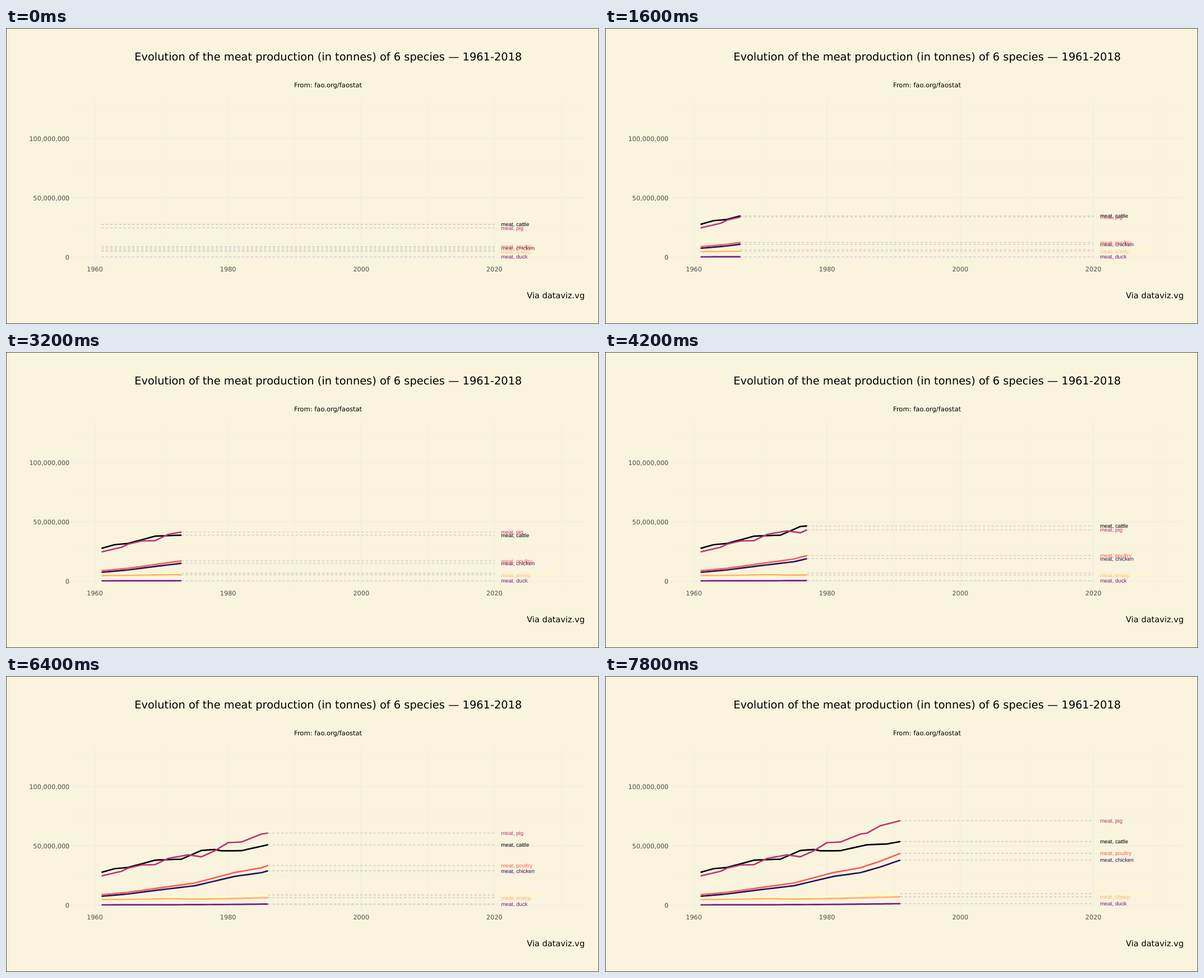
An HTML page that plays this animation: 1058 by 529 pixels, repeating every 8000 ms.

```html
<!DOCTYPE html>
<html lang="en">
<head>
<meta charset="utf-8">
<title>Meat production</title>
<style>
  html, body { margin: 0; width: 100%; height: 100%; overflow: hidden; background: #faf3dd; }
  svg { display: block; width: 1058px; height: 529px; text-rendering: geometricPrecision; }
  text { font-family: "DejaVu Sans", sans-serif; }
  .axis { font-size: 11.3px; fill: #4d4d4d; }
  .mid { text-anchor: middle; }
  .end { text-anchor: end; }
  .label { font: 9.7px "Liberation Sans", Arial, sans-serif; }
  .major { stroke: #ebebeb; stroke-width: 1.07; }
  .minor { stroke: #ebebeb; stroke-width: .53; }
  .dash { stroke: #bebebe; stroke-width: 1.07; stroke-dasharray: 3.92; }
  .line { fill: none; stroke-width: 2.7; stroke-linejoin: round; }
</style>
</head>
<body>
<svg viewBox="0 0 1058 529">
  <g id="grid"></g>
  <g id="plot"></g>
  <text class="mid" x="574.8" y="58" font-size="19.42">Evolution of the meat production (in tonnes) of 6 species — 1961-2018</text>
  <text class="mid" x="574.6" y="105.5" font-size="11.55">From: fao.org/faostat</text>
  <text class="end" x="1032.4" y="482.9" font-size="14.6">Via dataviz.vg</text>
  <rect x=".5" y=".5" width="1057" height="528" fill="none" stroke="#4b4942"/>
</svg>
<script>
const STEP = 200, LOOP = 8000, START = 1961, YEARS = 30;
const PANEL = { left: 117.1, right: 1031.9, top: 126, bottom: 421 };
const px = year => 158.6 + (year - 1960) * 11.88;
const py = millions => 409.7 - millions * 2.124;

// Straight runs through a few [years since start, value] turning points.
const through = (...pts) => t => {
  const i = Math.max(1, pts.findIndex(([x]) => x >= t));
  const [[a, va], [b, vb]] = [pts[i - 1], pts[i]];
  return va + (vb - va) * (t - a) / (b - a);
};
// Accelerating growth between two values.
const growth = (from, to, power) => t => from + (to - from) * (t / YEARS) ** power;
const sum = (f, g) => t => f(t) + g(t);

// Millions of tonnes.
const cattle = through([0, 27.7], [2, 30.8], [4, 31.8], [8, 37.9], [12, 38.8],
  [15, 46.1], [17, 46.9], [18, 45.8], [21, 45.9], [25, 50.9], [28, 51.6], [30, 53.6]);
const pig = through([0, 24.7], [3, 28.6], [4, 31.3], [6, 33.9], [8, 34.1], [10, 39.4],
  [13, 42.4], [15, 40.8], [17, 45.8], [19, 52.7], [21, 53.2], [24, 59.9], [25, 60.7],
  [27, 66.9], [30, 71.2]);
const chicken = through([0, 7.5], [4, 9.5], [9, 13.1], [14, 16.4], [20, 24.3],
  [24, 27.4], [27, 32.2], [30, 38]);
const sheep = through([0, 4.9], [3, 4.95], [11, 5.6], [13, 5.15], [18, 5.4], [30, 7.1]);
const duck = growth(.34, 1.35, 2.4);
const otherPoultry = growth(1.35, 5.7, 2);
const goat = growth(1.1, 2.7, 1.9);

const series = [
  ["meat, cattle", "#000004", cattle],
  ["meat, chicken", "#2d1160", chicken],
  ["meat, duck", "#721f81", duck],
  ["meat, pig", "#b63679", pig],
  ["meat, poultry", "#f1605d", sum(chicken, otherPoultry)],
  ["meat, sheep", "#feaf77", sheep],
  ["sheep and goat meat", "#fcfdbf", sum(sheep, goat)]
];

const line = (cls, x1, y1, x2, y2) =>
  `<line class="${cls}" x1="${x1}" y1="${y1}" x2="${x2}" y2="${y2}"/>`;
const text = (cls, x, y, str, fill) =>
  `<text class="${cls}" x="${x}" y="${y}"${fill ? ` fill="${fill}"` : ""}>${str}</text>`;

function drawGrid() {
  const { left, right, top, bottom } = PANEL;
  let out = "";
  for (let v = 0; v <= 125; v += 25) {
    const major = v % 50 === 0;
    out += line(major ? "major" : "minor", left, py(v), right, py(v));
    if (major) out += text("axis end", 113.3, py(v) + 4.4, (v * 1e6).toLocaleString("en-US"));
  }
  for (let year = 1960; year <= 2030; year += 10) {
    const major = year % 20 === 0;
    out += line(major ? "major" : "minor", px(year), top, px(year), bottom);
    if (major) out += text("axis mid", px(year), 435.3, year);
  }
  document.getElementById("grid").innerHTML = out;
}

// Each year lands on a whole step; steps in between are interpolated.
const stepOf = year => Math.round(year * 74 / 57);
function yearAt(step) {
  let k = 0;
  while (k < YEARS && stepOf(k + 1) <= step) k++;
  return k + (step - stepOf(k)) / (stepOf(k + 1) - stepOf(k));
}

const plot = document.getElementById("plot");
function draw(step) {
  const now = Math.min(yearAt(step), YEARS);
  const times = [];
  for (let t = 0; t < now; t++) times.push(t);
  times.push(now);
  let lines = "", dashes = "", labels = "";
  for (const [name, color, value] of series) {
    const y = py(value(now));
    const pts = times.map(t => `${px(START + t).toFixed(2)},${py(value(t)).toFixed(2)}`);
    lines += `<polyline class="line" stroke="${color}" points="${pts.join(" ")}"/>`;
    dashes += line("dash", px(START + now), y, px(2020), y);
    labels += text("label", px(2021), y + 3.5, name, color);
  }
  plot.innerHTML = lines + dashes + labels;
}

drawGrid();
let shown = -1;
const begin = performance.now();
function tick() {
  const step = Math.floor((performance.now() - begin) % LOOP / STEP);
  if (step !== shown) draw(shown = step);
  requestAnimationFrame(tick);
}
tick();
</script>
</body>
</html>
```
